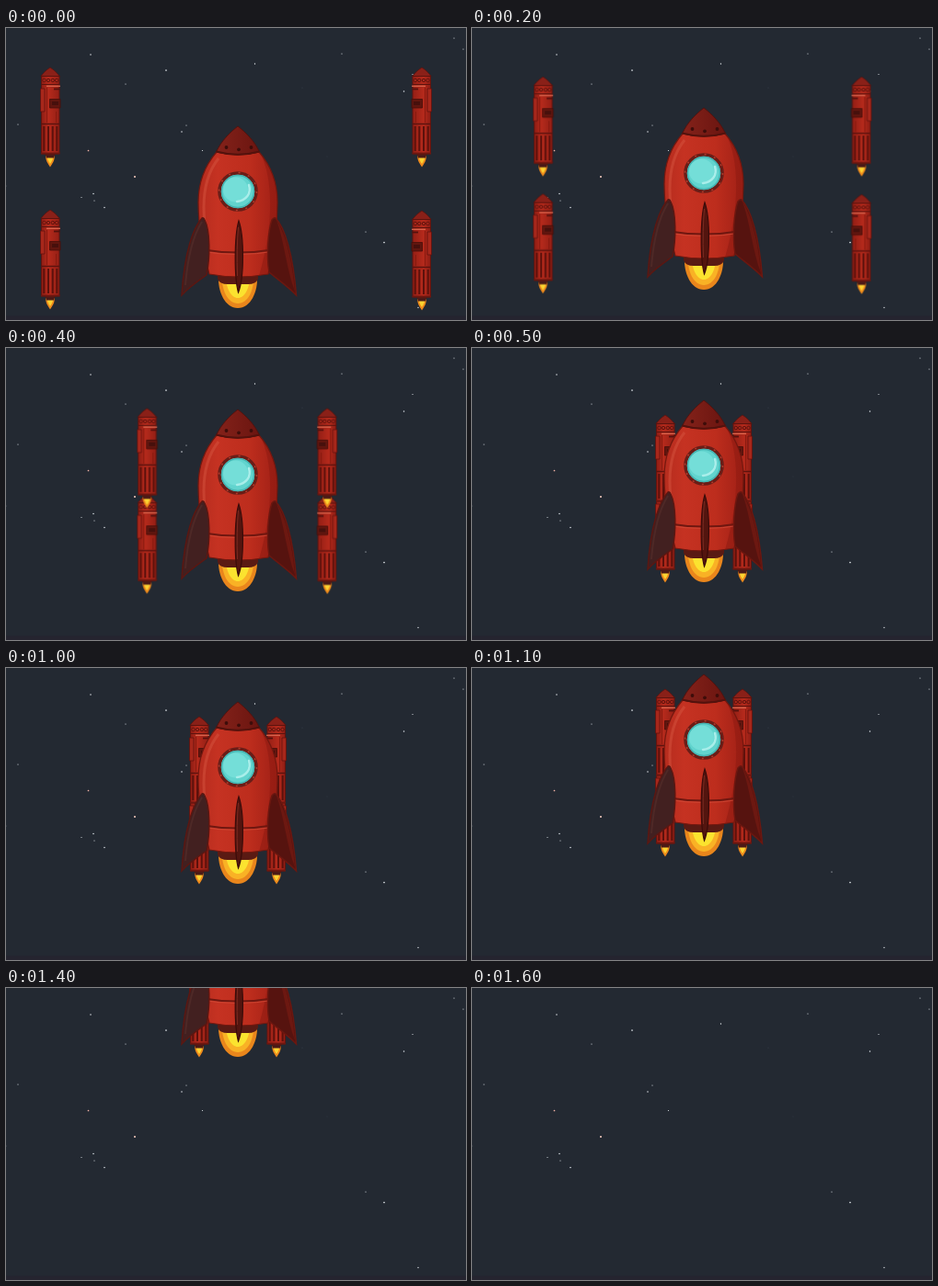
These frames come from a looping animation (500x318 px, 2.1 s). An HTML page:

```html
<!DOCTYPE html>
<html lang="en">
<head>
<meta charset="utf-8">
<title>Rocket assembly</title>
<style>
  html, body { margin: 0; width: 100%; height: 100%; overflow: hidden; background: #232932; }
  svg { display: block; width: 100vw; height: 100vh; }
  .ship, .hull, .booster { animation: 2.1s step-end infinite; }
  .ship { animation-name: launch; }
  .hull { animation-name: rise; }
  .booster { animation-name: dock; }

  @keyframes rise {
    0% { transform: translateY(0); }
    4.76% { transform: translateY(-10px); }
    9.52% { transform: translateY(-20px); }
    14.28% { transform: translateY(-30px); }
    19.04% { transform: translateY(-40px); }
    23.8%, 100% { transform: translateY(-50px); }
  }
  /* --dx and --dy are the full distance to the docked place */
  @keyframes dock {
    0% { transform: translate(0, 0); }
    4.76% { transform: translate(calc(var(--dx) * .06), calc(var(--dy) * .17)); }
    9.52% { transform: translate(calc(var(--dx) * .18), calc(var(--dy) * .34)); }
    14.28% { transform: translate(calc(var(--dx) * .358), calc(var(--dy) * .52)); }
    19.04% { transform: translate(calc(var(--dx) * .65), calc(var(--dy) * .76)); }
    23.8%, 100% { transform: translate(var(--dx), var(--dy)); }
  }
  @keyframes launch {
    0% { transform: translateY(0); }
    47.61% { transform: translateY(-20px); }
    52.38% { transform: translateY(-50px); }
    57.14% { transform: translateY(-80px); }
    61.9% { transform: translateY(-130px); }
    66.66% { transform: translateY(-180px); }
    71.42% { transform: translateY(-230px); }
    76.19%, 100% { transform: translateY(-400px); }
  }
</style>
</head>
<body>
<svg viewBox="0 0 500 318" preserveAspectRatio="none">
  <defs>
    <linearGradient id="skin">
      <stop offset="0" stop-color="#b52c1e"/>
      <stop offset=".25" stop-color="#c53222"/>
      <stop offset=".65" stop-color="#bd2d1d"/>
      <stop offset="1" stop-color="#a02016"/>
    </linearGradient>
    <linearGradient id="nose">
      <stop offset="0" stop-color="#84221a"/>
      <stop offset="1" stop-color="#6b1510"/>
    </linearGradient>
    <linearGradient id="tube">
      <stop offset="0" stop-color="#8e1d14"/>
      <stop offset=".4" stop-color="#b52a1c"/>
      <stop offset="1" stop-color="#941f15"/>
    </linearGradient>
    <clipPath id="bodyClip">
      <path id="body" d="M229 135C216 150 209 168 209 190C209 220 215 245 221 268Q252 274 285 268C290 245 295 222 295 190C295 168 288 150 275 135Q252 141 229 135Z"/>
    </clipPath>

    <!-- tip of the nose at the origin -->
    <g id="rocket">
      <path d="M-4.8 96C-5 102-2 105 0 108.5C2 105 5 102 4.8 96Z" fill="#ee8a1c"/>
      <path d="M-3.2 97C-3 101-1 103 0 105C1 103 3 101 3.2 97Z" fill="#fbd432"/>
      <path d="M-5.5 94H5.5L4 98.500H-4Z" fill="#4c1a16"/>
      <path d="M-9.500 9H10V94H-9.500Z" fill="url(#tube)" stroke="#64140e"/>
      <path d="M-10 9.500C-7 5-3 2 0 0C3 2 7 5 10.300 9.500Z" fill="#8a2018" stroke="#5c130e" stroke-width=".8"/>
      <path d="M-10 9.500H10.500M-9.500 18.500H10" stroke="#5c130e" stroke-width="1.200"/>
      <g fill="#a8281c" stroke="#5a120d" stroke-width=".9">
        <circle cx="-6.500" cy="14" r="1.700"/><circle cx="-2" cy="14" r="1.700"/>
        <circle cx="2.800" cy="14" r="1.700"/><circle cx="7.200" cy="14" r="1.700"/>
      </g>
      <path d="M-4 20.300H11" stroke="#db6a51" stroke-width="1.200"/>
      <path d="M4 23.500H10.500" stroke="#55110d" stroke-width="1.800"/>
      <path d="M-10.500 23H-6V48H-10.500Z" fill="#a7271b" stroke="#64140e" stroke-width=".8"/>
      <path d="M-3.500 22V60M6.500 48V60" stroke="#83190f" stroke-width=".8"/>
      <path d="M-.5 34.500H11V44H-.5Z" fill="#61160f" stroke="#470e0a" stroke-width=".8"/>
      <path d="M2 37H9V41H2Z" fill="#47100c"/>
      <path d="M-9.500 61.500H10" stroke="#5c130e" stroke-width="1.500"/>
      <path d="M-6.700 64V91M-2 64V91M2.700 64V91M7.300 64V91" stroke="#5c110c" stroke-width="2"/>
      <path d="M-10 93.500H10.500" stroke="#6d1710" stroke-width="1.800"/>
    </g>
  </defs>

  <rect width="500" height="318" fill="#232932"/>
  <rect y="313.500" width="500" height="4.500" fill="#25242f"/>
  <g id="stars"></g>

  <g class="ship">
    <g transform="translate(48 198)"><use href="#rocket" class="booster" style="--dx:162px;--dy:-51px"/></g>
    <g transform="translate(452 199) scale(-1 1)"><use href="#rocket" class="booster" style="--dx:158px;--dy:-52px"/></g>
    <g transform="translate(48 43)"><use href="#rocket" class="booster" style="--dx:162px;--dy:30px"/></g>
    <g transform="translate(452 43) scale(-1 1)"><use href="#rocket" class="booster" style="--dx:158px;--dy:30px"/></g>

    <g class="hull">
      <path d="M231 270C230 287 238 305 252 305C266 305 274 287 273 270Z" fill="#e9861c"/>
      <path d="M235 270C234 285 241 300 252 300C263 300 270 285 269 270Z" fill="#f9b225"/>
      <path d="M239 270C239 284 245 294 252 294C259 294 265 284 265 270Z" fill="#fbe32f"/>
      <path d="M230 268H274V273Q272 279 263 279H241Q232 279 230 273Z" fill="#5a1a13"/>

      <use href="#body" fill="url(#skin)"/>
      <g clip-path="url(#bodyClip)" fill="none">
        <path d="M276 135C291 165 291 215 275 270H300V135Z" fill="#8f1b12" opacity=".55"/>
        <path d="M231 142C215 162 211 192 219 232" stroke="#d4503c" stroke-width="3" opacity=".55"/>
        <path d="M211 241Q252 248 293 241" stroke="#6f1710" stroke-width="1.800"/>
        <path d="M211 243Q252 250 293 243" stroke="#d4503c" stroke-width=".7"/>
      </g>
      <use href="#body" fill="none" stroke="#74180f" stroke-width="1.200"/>

      <path d="M252 107C243 114 234 123 228.500 135Q252 141 275.500 135C270 123 261 114 252 107Z" fill="url(#nose)" stroke="#54120d"/>
      <path d="M228.500 134.500Q252 141 275.500 134.500" fill="none" stroke="#54120d" stroke-width="2"/>
      <g fill="#3d0d0a">
        <circle cx="239.500" cy="130" r="1.900"/><circle cx="253" cy="132.300" r="1.900"/><circle cx="266.500" cy="130" r="1.900"/>
      </g>

      <circle cx="252" cy="178" r="20" fill="#62d4ce" stroke="#6a1d17" stroke-width="3.600"/>
      <circle cx="252" cy="178" r="20.500" fill="none" stroke="#b33a2b" stroke-width="1.500" stroke-dasharray="2 8.733"/>
      <circle cx="252" cy="178" r="17.500" fill="none" stroke="#45b5b3" stroke-width="1.500"/>
      <circle cx="249.500" cy="176" r="13.500" fill="#74ded8"/>
      <path d="M264 171C267 180 261 188 251 189" fill="none" stroke="#a9eeea" stroke-width="2.500" stroke-linecap="round"/>

      <path d="M213 207C204 217 194 242 191 291C199 282 211 274 218 269C222 249 222 221 216 209Q215 206 213 207Z" fill="#422020" stroke="#5b1712" stroke-width="1.500"/>
      <path d="M213 211C204 225 198 244 195 280" fill="none" stroke="#57302c" stroke-width="2" opacity=".6"/>
      <path d="M293 207C303 217 312 247 315.500 291C307 282 293 272 286 266C283 248 285 221 289 209Q291 206 293 207Z" fill="#56130f" stroke="#6b1710" stroke-width="1.500"/>
      <path d="M294 209C303 223 311 250 314 287C305 263 302 231 294 209Z" fill="#7c1c13" opacity=".6"/>
      <path d="M253 210C259 227 259 272 252.500 288C248 272 248 227 253 210Z" fill="#53150f" stroke="#3a0c0a" stroke-width="1.200"/>
      <path d="M252.500 217Q250.500 240 251.500 270" fill="none" stroke="#7b2a20" stroke-width="1"/>
    </g>
  </g>
</svg>
<script>
  // x, y, size, optional colour
  const stars = [
    [92, 29, 1.5], [174, 46, 1.7], [130, 61, 1.2], [270.5, 39, 1.3], [365, 28, 1.2],
    [442, 50.5, 1.2], [432.5, 69, 1.5], [487, 11, 1.2], [497, 23, 1.2], [13, 105, 1.2],
    [196, 106, 1.2], [191, 113, 1.5], [213.5, 133.5, 1.2], [89.5, 133.5, 1.7, "#f5b5a8"],
    [140, 162, 2, "#ffd3c4"], [95, 180.5, 1.5], [82, 184.5, 1.1], [96, 188, 1.2],
    [107, 195.5, 1.5], [391, 222, 1.2], [411, 233.5, 1.7], [448, 304.5, 1.3],
    [322, 65, 1, "#3d444e"], [349, 140, 1, "#343b45"], [0.5, 172, 1, "#4a515b"]
  ];
  document.getElementById("stars").innerHTML = stars.map(([x, y, d, fill = "#e4e9ee"]) =>
    `<circle cx="${x}" cy="${y}" r="${d / 2}" fill="${fill}"/>`).join("");
</script>
</body>
</html>
```
